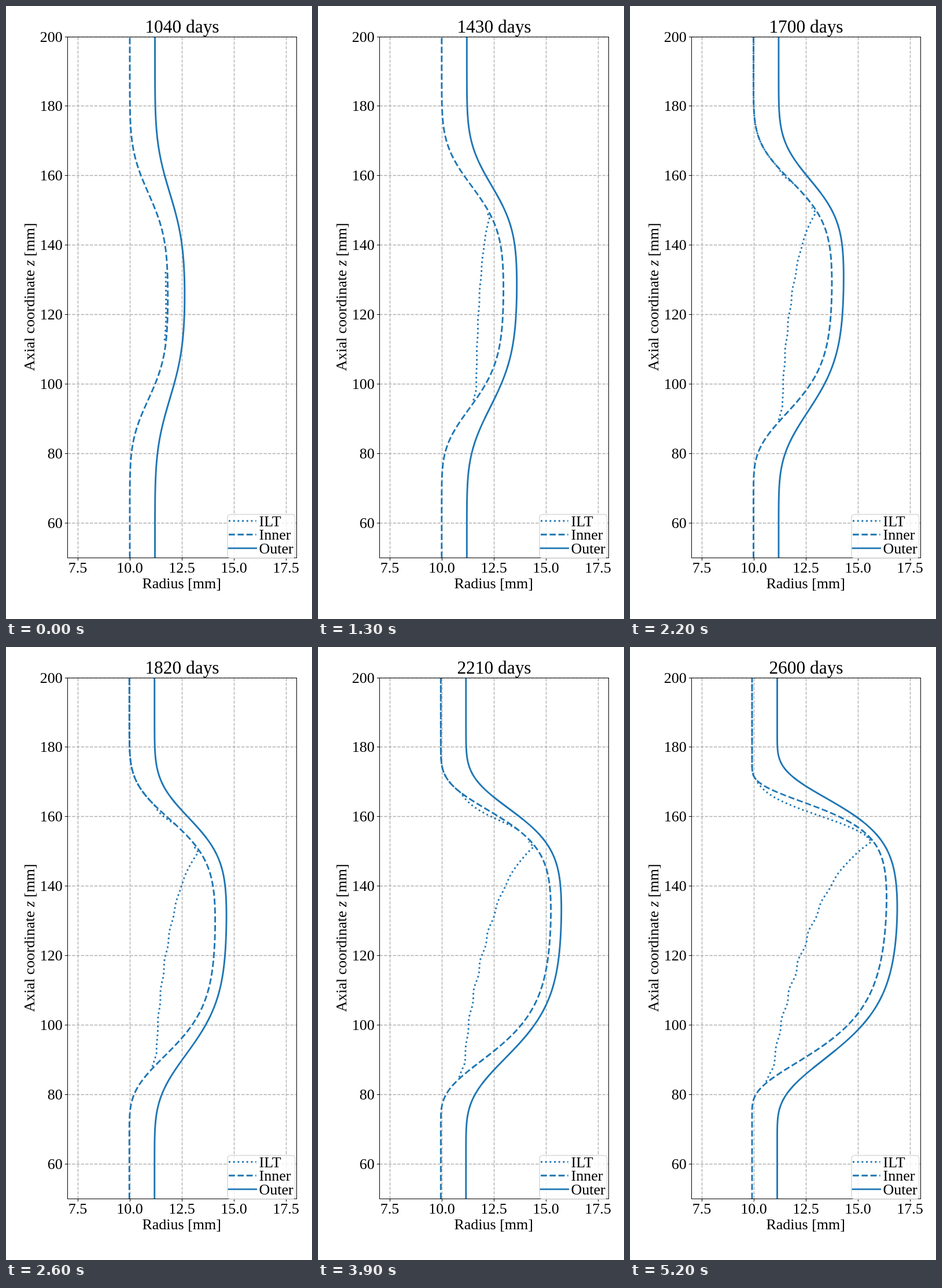
These frames come from a looping animation (529x1058 px, 5300 ms). An HTML page with a canvas:

```html
<!DOCTYPE html>
<html lang="en">
<head>
<meta charset="utf-8">
<title>Wall growth</title>
<style>
html, body { margin: 0; width: 100%; height: 100%; overflow: hidden; background: #fff; }
canvas { display: block; width: 529px; height: 1058px; }
</style>
</head>
<body>
<canvas id="c" width="529" height="1058"></canvas>
<script>
const ctx = document.getElementById('c').getContext('2d');
const BLUE = '#1f77b4', GREY = '#b0b0b0';
const FONT = '"Liberation Serif", "Times New Roman", serif';
const STEP = 100, STEPS = 53;
const L = 106.5, R = 502.5, T = 53.5, B = 952.5;
const LW = 2.9, DASH = [3.7 * LW, 1.6 * LW], DOTS = [LW, 1.65 * LW];
const px = mm => 124 + (mm - 7.5) * 36.06;
const py = mm => 53 + (200 - mm) * 5.995;
const snap = v => Math.floor(v) + 0.5;
const clamp = u => Math.max(0, Math.min(1, u));

// Skewed normal step: d is the distance inside, s the width, k the skew
function rise(d, s, k) {
  const z = Math.log(Math.max(1e-3, 1 + k * d / s)) / k;
  return 1 / (1 + Math.exp(-1.596 * z - 0.0706 * z ** 3));
}

// Each wall is a bulge between an upper and a lower flank; p runs 0..1
const bulge = (base, size, top, low) => y =>
  base + size * rise(y - top[0], top[1], top[2]) * rise(low[0] - y, low[1], low[2]);

const innerWall = p => bulge(
  214 - 3 * p * p, 66 + 164 * p + 7 * p * p,
  [325 - 46 * p, 60 - 23 * p * p, 0.03 + 0.34 * p * p],
  [677 + 46 * p - 32 * p * p, 58 + 7 * p, 0.05 + 0.43 * p]);

const outerWall = p => bulge(
  257.5 - 3 * p * p, 52 + 134 * p + 25 * p * p,
  [324 - 51 * p, 69 - 44 * p + 25 * p * p, 0.02 + 0.25 * p * p],
  [677 + 45 * p - 30 * p * p, 70, 0.02 + 0.31 * p]);

function line(pts, color, width, dash = []) {
  ctx.beginPath();
  pts.forEach(p => ctx.lineTo(p[0], p[1]));
  ctx.strokeStyle = color;
  ctx.lineWidth = width;
  ctx.setLineDash(dash);
  ctx.stroke();
}

function text(s, x, y, size, align = 'center', style = '') {
  ctx.font = `${style} ${size}px ${FONT}`;
  ctx.textAlign = align;
  ctx.fillStyle = '#000';
  ctx.fillText(s, x, y);
}

// Points of x = f(y), from the bottom up
function trace(f, from = B, to = T) {
  const pts = [];
  for (let y = from; y > to; y -= 2) pts.push([f(y), y]);
  pts.push([f(to), to]);
  return pts;
}

function drawGrid() {
  const dash = [5.4, 2.3];
  for (let mm = 7.5; mm < 18; mm += 2.5) {
    const x = snap(px(mm));
    line([[x, B], [x, T]], GREY, 1.4, dash);
    line([[x, B], [x, B + 4.6]], '#000', 1);
    text(mm.toFixed(1), x - 0.4, 978, 26);
  }
  for (let mm = 60; mm <= 200; mm += 20) {
    const y = snap(py(mm));
    line([[L, y], [R, y]], GREY, 1.4, dash);
    line([[L - 4.6, y], [L, y]], '#000', 1);
    text(mm, 97.8, y + 8.6, 26, 'right');
  }
}

function drawLabels(n) {
  text(1040 + 30 * n + ' days', 304.5, 46.3, 31.4);
  text('Radius [mm]', 303.7, 1005, 26);
  ctx.save();
  ctx.translate(48.5, 630);
  ctx.rotate(-Math.PI / 2);
  let x = 0;
  for (const [s, style] of [['Axial coordinate ', ''], ['z', 'italic'], [' [mm]', '']]) {
    text(s, x, 0, 26.1, 'left', style);
    x += ctx.measureText(s).width;
  }
  ctx.restore();
}

function drawThrombus(wall, n, p) {
  const tip = 372 - 36 * p + 86 * Math.exp(-n / 3);
  const foot = 756 - 179 * Math.exp(-n / 15);
  const x0 = wall(foot) - 3, kick = 3 + 8 * p, span = wall(tip) - 3 - x0 - kick;
  const surface = y => {
    const u = (foot - y) / (foot - tip);
    const climb = 0.75 * u ** (2.2 - 0.7 * p) + 0.25 * u ** 10;
    const ripple = Math.sin(y / 8) * Math.sin(Math.PI * u) * 2 * p;
    return Math.min(x0 + kick * clamp(u * 16) + span * climb + ripple, wall(y) - 2.5);
  };
  const pts = trace(surface, foot, tip);
  if (n >= 8) pts.push([wall(tip - 9) - 4, tip - 9]);
  line(pts, BLUE, LW, DOTS);

  // Upper pocket hangs just below the wall and follows it above
  if (n < 20) return;
  const late = (n - 26) / 26;
  const top = 273 - 45 * late, end = 306 + 28 * late * late;
  const depth = 0.33 * (n - 11);
  const sag = y => depth * Math.sin(Math.PI * clamp((y - top) / (end - top)));
  line(trace(y => wall(y - sag(y)), end), BLUE, LW, DOTS);
}

function drawLegend() {
  ctx.beginPath();
  ctx.roundRect(383, 877.5, 117, 75.5, 5);
  ctx.fillStyle = 'rgba(255,255,255,.8)';
  ctx.fill();
  ctx.setLineDash([]);
  ctx.strokeStyle = 'rgba(204,204,204,.8)';
  ctx.lineWidth = 1.4;
  ctx.stroke();
  [['ILT', DOTS], ['Inner', DASH], ['Outer', []]].forEach(([name, dash], i) => {
    const y = 888.7 + 23.6 * i, cap = dash.length ? 0 : 1.4;
    line([[385 - cap, y], [432.6 + cap, y]], BLUE, LW, dash);
    text(name, 437.5, y + 9, 26, 'left');
  });
}

function draw(n) {
  const p = n / (STEPS - 1), wall = innerWall(p);
  ctx.fillStyle = '#fff';
  ctx.fillRect(0, 0, 529, 1058);
  drawGrid();
  drawLabels(n);
  ctx.save();
  ctx.beginPath();
  ctx.rect(L, T, R - L, B - T);
  ctx.clip();
  ctx.lineJoin = 'round';
  drawThrombus(wall, n, p);
  line(trace(wall), BLUE, LW, DASH);
  line(trace(outerWall(p)), BLUE, LW);
  ctx.restore();
  ctx.setLineDash([]);
  ctx.strokeStyle = '#000';
  ctx.lineWidth = 1;
  ctx.strokeRect(L, T, R - L, B - T);
  drawLegend();
}

const start = performance.now();
let shown = -1;
function tick() {
  const n = Math.floor((performance.now() - start) / STEP) % STEPS;
  if (n !== shown) draw(shown = n);
  requestAnimationFrame(tick);
}
tick();
</script>
</body>
</html>
```
